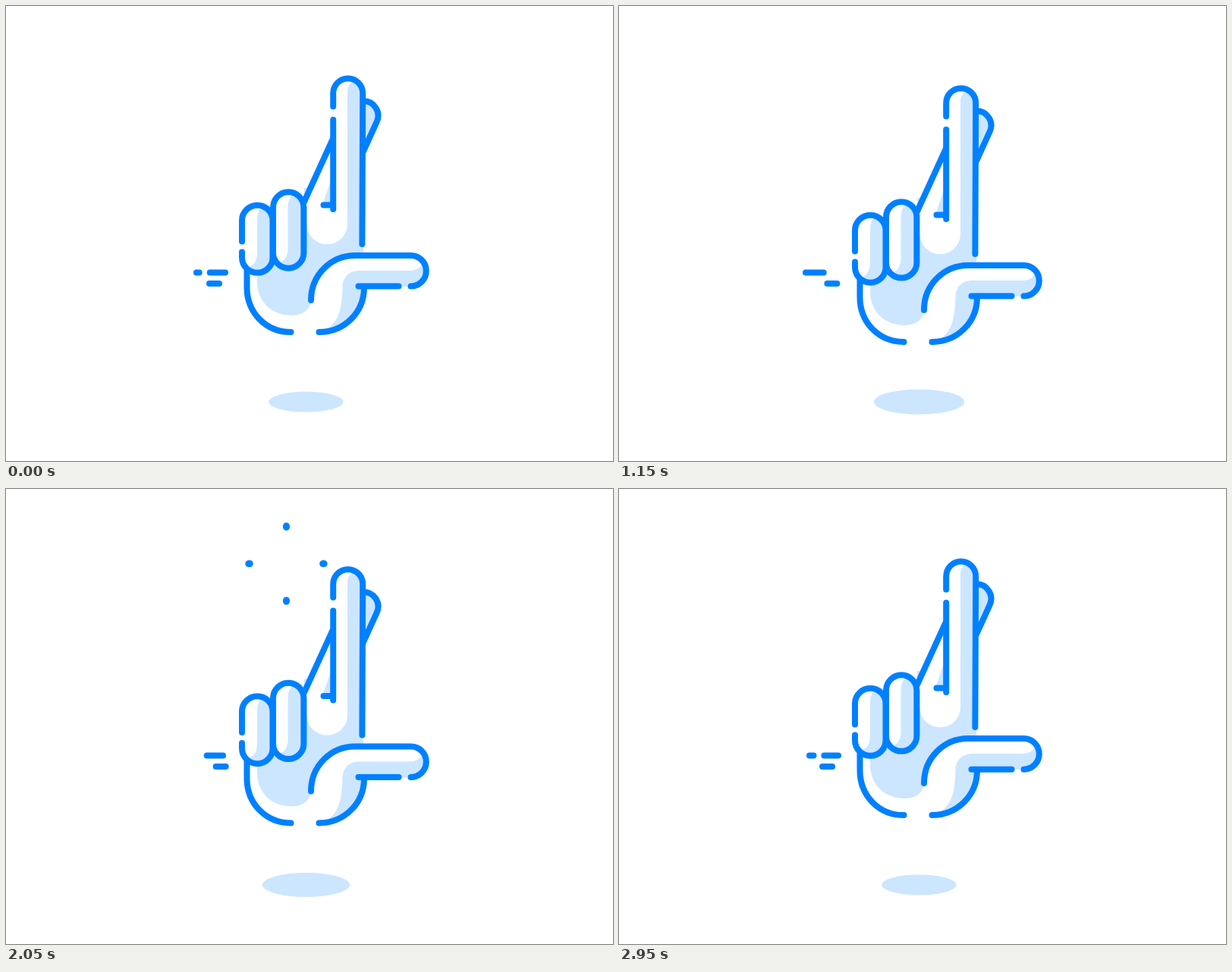
An HTML page for the animation above (3000 ms loop, 800 px wide and 600 px high).

```html
<!DOCTYPE html>
<html>
<head>
<meta charset="utf-8">
<style>
  html, body { margin: 0; width: 100%; height: 100%; overflow: hidden; background: #fff; }
  svg { display: block; width: 800px; height: 600px; }
  .line { fill: none; stroke: #0080ff; stroke-width: 8; stroke-linecap: round; stroke-linejoin: round; }
  .white { fill: #fff; }
  .tint { fill: #cce6ff; }
</style>
</head>
<body>
<svg viewBox="0 0 800 600">
  <ellipse id="shadow" class="tint" cx="395.5" cy="522"/>
  <path id="spark" class="line"/>
  <path id="speed" class="line"/>
  <g id="hand">
    <!-- palm and thumb shading -->
    <path class="tint" d="M331 340V363C331 390 350 408 377 408C389 408 398 403 402 391C402 355 428 329 460 329H471V240H393V340Z"/>
    <path class="tint" d="M550 337C546 346 540 349 531 349H464A20.5 20.5 0 0 0 443.5 370C443 402 437 424 414 429C447 430 472 404 472 370H533.5A20.3 20.3 0 0 0 550 337Z"/>
    <path class="line" d="M317.5 346V371C317.5 404 342 430 375.5 430M412.5 430C446 430 472 404 472 371"/>
    <!-- crossed finger behind -->
    <path class="white" d="M393 258L431 175V262H450V288A26.8 26.3 0 0 1 396.4 288Z"/>
    <path class="tint" d="M431 222L417 262H431Z"/>
    <path class="tint" d="M471 125.3A19.3 19.3 0 0 1 488.5 153L471 191.5Z"/>
    <path class="line" d="M471 125.3A19.3 19.3 0 0 1 488.5 153L471 191.5M393 258L430 177"/>
    <!-- index finger -->
    <path class="white" d="M431.2 268V115A19.5 19.5 0 0 1 470.2 115V268Z"/>
    <path class="tint" d="M450 320V113C450 105 454 100 462 98L470 110V320Z"/>
    <path class="line" d="M431.2 132.5V115A19.5 19.5 0 0 1 470.2 115L469.4 314M431.2 150V268M418.5 262.5H431"/>
    <!-- folded fingers -->
    <rect class="tint" x="311" y="263" width="40.5" height="88.7" rx="20.2"/>
    <path class="white" d="M311 283A20.2 20.2 0 0 1 339 264C333 268 331 275 331 282V325C331 338 325 345 315 345L311 331Z"/>
    <path class="line" d="M311 310.5V283A20.2 20.2 0 0 1 351.5 283V331.5A20.2 20.2 0 0 1 311 331.5V324.5"/>
    <rect class="tint" x="352" y="245.3" width="40.4" height="100.4" rx="20.2"/>
    <path class="white" d="M352 265A20.2 20.2 0 0 1 380 247C374 251 371.5 258 371.5 265V319C371.5 332 366 339 356 339L352 325Z"/>
    <rect class="line" x="352" y="245.3" width="40.4" height="100.4" rx="20.2"/>
    <!-- thumb outline -->
    <path class="line" d="M402 388C402 355 428 329 460 329H533.5A20.3 20.3 0 0 1 533.5 369.6M464.5 369.6H517.5"/>
  </g>
</svg>
<script>
const LOOP = 3000, STEP = 50;
const [shadow, spark, speed, hand] = ['shadow', 'spark', 'speed', 'hand'].map(id => document.getElementById(id));
const progress = (t, a, b) => Math.min(1, Math.max(0, (t - a) / (b - a)));
const ease = x => (1 - Math.cos(Math.PI * x)) / 2;

// Rises from a to b, then falls back by c
const pulse = (t, a, b, c) => ease(progress(t, a, b)) - ease(progress(t, b, c));

// A dash runs leftwards: its head leaves first, its tail follows
function dash(t, { from, to, head, tail, bend }) {
  if (t < head[0] || t >= tail[1]) return '';
  const left = from + (to - from) * (1 - (1 - progress(t, ...head)) ** bend);
  const right = from + (to - from) * progress(t, ...tail);
  return `M${left} 351.5H${right}`;
}

const dashes = [
  { from: 289, to: 246, head: [2450, 3950], tail: [3500, 4950], bend: 1.4 },
  { from: 286, to: 251, head: [1350, 2500], tail: [2150, 3100], bend: 1 }
];

function drawSpeed(t) {
  const x = 268 + 9.3 * pulse(t, 0, 1850, LOOP);
  const upper = dashes.map(d => dash(t, d) + dash(t + LOOP, d)).join('');
  speed.setAttribute('d', `M${x} 366h13` + upper);
}

const bursts = [
  { x: 519, y: 242.8, times: [300, 600, 995] },
  { x: 365, y: 94, times: [1760, 2000, 2240] }
];

function drawSpark(t) {
  let d = '', width = 0;
  for (const { x, y, times } of bursts) {
    const p = pulse(t, ...times);
    if (p < 0.01) continue;
    const r = 56 * p - 2, cx = x + 5 * p, cy = y + 5 * p;
    width = Math.min(9, 3 + 13 * p);
    for (const [dx, dy] of [[1, 0], [0, 1], [-1, 0], [0, -1]])
      d += `M${cx + dx * r} ${cy + dy * r}l${dx * 1.5} ${dy * 1.5}`;
  }
  spark.setAttribute('d', d);
  spark.style.strokeWidth = width;
}

function draw(now) {
  const t = Math.floor(now % LOOP / STEP) * STEP;
  const drop = pulse(t, 0, LOOP / 2, LOOP);
  hand.setAttribute('transform', `translate(0 ${14.8 * drop})`);
  shadow.setAttribute('rx', 49 + 12.2 * drop);
  shadow.setAttribute('ry', 13.5 + 3.4 * drop);
  drawSpeed(t);
  drawSpark(t);
}

const start = performance.now();
function frame() {
  draw(performance.now() - start);
  requestAnimationFrame(frame);
}
frame();
</script>
</body>
</html>
```
